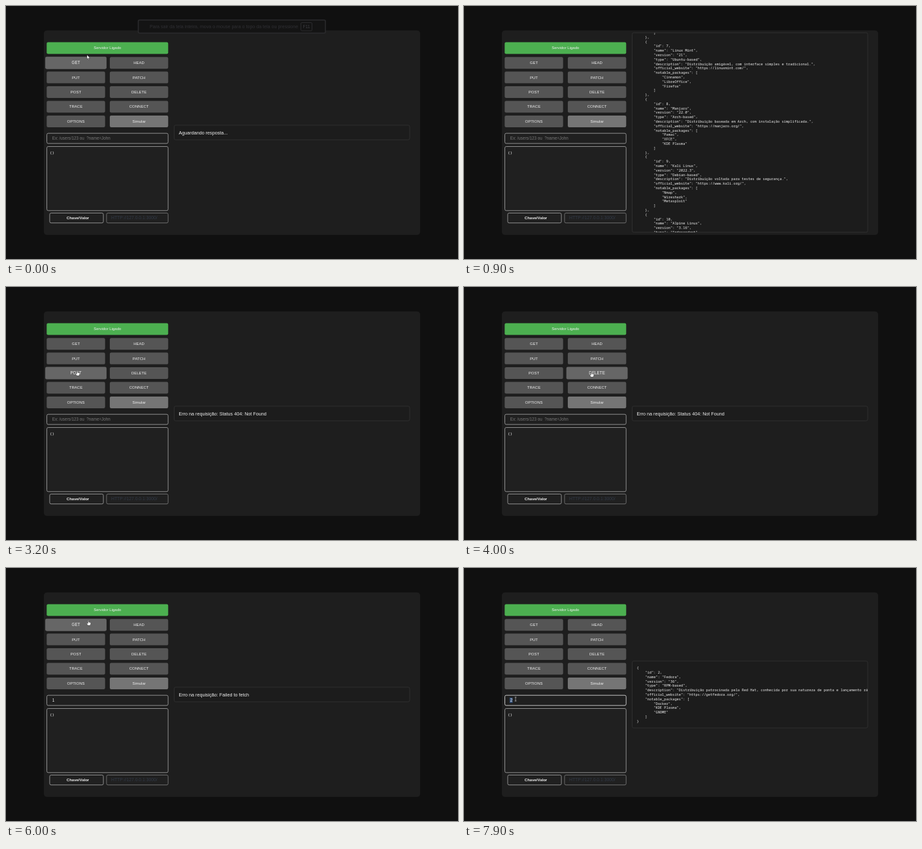
Animation of 692x388 px, one loop 8 s. Source, as an HTML page:

```html
<!DOCTYPE html>
<html lang="pt">
<head>
<meta charset="utf-8">
<title>Simulador HTTP</title>
<style>
html, body { margin: 0; width: 100%; height: 100%; overflow: hidden; background: #101010; }
svg { display: block; width: 100vw; height: 100vh; }
text { font-family: "Liberation Sans", Arial, sans-serif; fill: #f0f0f0; white-space: pre; }
.mono { font-family: "Noto Sans Mono", "DejaVu Sans Mono", monospace; font-size: 5.36px; }
.mid { text-anchor: middle; font-size: 6px; }
.field { fill: #202020; stroke: #9a9a9a; stroke-width: .9; }
</style>
</head>
<body>
<svg id="stage" viewBox="0 0 692 388"></svg>
<script>
const LOOP = 8000, STEP = 100;
const MID_Y = 194, PAD = 7, MONO_LINE = 6.8, SANS_LINE = 8.3, MAX_H = 306;
const stage = document.getElementById('stage');

function add(parent, tag, attrs = {}, text = '') {
  const el = document.createElementNS('http://www.w3.org/2000/svg', tag);
  set(el, attrs);
  if (text) el.textContent = text;
  parent.appendChild(el);
  return el;
}
function set(el, attrs) {
  for (const key in attrs) el.setAttribute(key, attrs[key]);
}
const rect = (parent, x, y, width, height, rx, attrs) =>
  add(parent, 'rect', { x, y, width, height, rx, ...attrs });

// Server data
const distro = (id, name, version, type, description, site, packages) => ({
  id, name, version, type, description,
  official_website: `https://${site}/`,
  notable_packages: packages.split(',')
});
const distros = [
  distro(1, 'Ubuntu', '22.04 LTS', 'Debian-based', 'Uma distribuição popular e fácil de usar, ideal para iniciantes e servidores.', 'ubuntu.com', 'GNOME,LibreOffice,Firefox'),
  distro(2, 'Fedora', '36', 'RPM-based', 'Distribuição patrocinada pela Red Hat, conhecida por sua natureza de ponta e lançamento rápido.', 'getfedora.org', 'Docker,KDE Plasma,GNOME'),
  distro(3, 'Arch Linux', 'Rolling Release', 'Independent', 'Distribuição leve e flexível, voltada para usuários avançados.', 'archlinux.org', 'Pacman,Xorg,Vim'),
  distro(4, 'Debian', '11 (Bullseye)', 'Debian-based', 'Uma das distribuições mais estáveis e com uma vasta biblioteca de pacotes, ideal para servidores.', 'www.debian.org', 'Apache,Nginx,MySQL'),
  distro(5, 'CentOS', 'Stream 9', 'RPM-based', 'Distribuição popular entre servidores, baseada no código-fonte do Red Hat Enterprise Linux.', 'www.centos.org', 'MariaDB,SELinux,Kubernetes'),
  distro(6, 'openSUSE', 'Leap 15.4', 'RPM-based', 'Uma distribuição estável, conhecida por sua versatilidade e opções de instalação.', 'www.opensuse.org', 'YaST,KDE Plasma,GNOME'),
  distro(7, 'Linux Mint', '21', 'Ubuntu-based', 'Distribuição amigável, com interface simples e tradicional.', 'linuxmint.com', 'Cinnamon,LibreOffice,Firefox'),
  distro(8, 'Manjaro', '22.0', 'Arch-based', 'Distribuição baseada em Arch, com instalação simplificada.', 'manjaro.org', 'Pamac,XFCE,KDE Plasma'),
  distro(9, 'Kali Linux', '2022.3', 'Debian-based', 'Distribuição voltada para testes de segurança.', 'www.kali.org', 'Nmap,Wireshark,Metasploit'),
  distro(10, 'Alpine Linux', '3.16', 'Independent', 'Distribuição mínima, muito usada em contêineres.', 'alpinelinux.org', 'BusyBox,OpenRC,musl')
];
const failed = 'Erro na requisição: ';
const unsupported = method =>
  `${failed}Failed to execute 'fetch' on\n'Window': '${method}' HTTP method is unsupported.`;

// [start, content]: objects are shown as JSON, strings as plain text
const responses = [
  [0, 'Aguardando resposta...'],
  [500, distros],
  [1500, { 'content-length': '3313', 'content-type': 'application/json; charset=utf-8' }],
  [2100, failed + 'Status 404: Not Found'],
  [4300, unsupported('TRACE')],
  [4600, unsupported('CONNECT')],
  [5100, failed + 'Failed to fetch'],
  [6100, distros[0]],
  [6900, distros[1]]
];
const scrollKeys = [[500, 0], [700, 267], [900, 534], [1000, 605]];
const pointerKeys = [
  [0, 124, 75], [100, 126, 82], [200, 124, 84], [400, 124, 84],
  [1100, 300, 130], [1300, 200, 86], [1500, 200, 86], [1700, 200, 103], [1800, 201, 106], [2000, 201, 106],
  [2300, 120, 106], [2700, 105, 107], [2800, 105, 107], [3000, 108, 111], [3100, 108, 111],
  [3200, 109, 128], [3500, 110, 129], [3600, 110, 129], [3800, 170, 130], [4000, 195, 130],
  [4200, 118, 150], [4300, 108, 151], [4500, 190, 151], [4600, 190, 152], [4800, 101, 178], [5200, 101, 178],
  [5400, 90, 201], [5600, 90, 201], [5900, 124, 84], [6000, 126, 80], [6300, 126, 80],
  [6500, 90, 202], [6600, 46, 203], [6700, 90, 190], [6900, 122, 84], [7000, 122, 84],
  [7500, 84, 201], [7700, 47, 204], [7900, 79, 201]
];
const typed = [[0, ''], [5600, '1'], [6700, '2']];

const within = (t, a, b) => t >= a && t < b;
const latest = (keys, t) => keys.filter(k => k[0] <= t).pop();
function tween(keys, t) {
  const i = keys.findIndex(k => k[0] > t);
  if (i < 0) return keys[keys.length - 1].slice(1);
  if (i === 0) return keys[0].slice(1);
  const a = keys[i - 1], b = keys[i];
  const p = (t - a[0]) / (b[0] - a[0]);
  return a.slice(1).map((v, n) => v + (b[n + 1] - v) * p);
}

// Static layout
rect(stage, 0, 0, 692, 388, 0, { fill: '#101010' });
rect(stage, 58, 37.5, 576, 313.5, 4.5, { fill: '#1e1e1e' });

const buttons = [];
function button(label, x, y, w, fill) {
  const g = add(stage, 'g');
  const cx = x + w / 2, cy = y + 9;
  const face = rect(g, x, y, w, 18, 2.2, { fill });
  add(g, 'text', { x: cx, y: cy + 1.9, class: 'mid' }, label);
  return { g, face, x, y, w, cx, cy, fill };
}
button('Servidor Ligado', 62.3, 55.5, 186, '#4caf50');
['GET', 'HEAD', 'PUT', 'PATCH', 'POST', 'DELETE', 'TRACE', 'CONNECT', 'OPTIONS', 'Simular']
  .forEach((label, i) => buttons.push(button(label,
    i % 2 ? 158.9 : 62.3, 78.2 + (i >> 1) * 22.42, 89.4, label === 'Simular' ? '#757575' : '#555555')));

const pathBox = rect(stage, 62.5, 195.2, 185.7, 15.6, 2.2, { class: 'field' });
const selection = rect(stage, 69.8, 198.8, 4.6, 8, 0, { fill: '#34507a' });
const pathText = add(stage, 'text', { x: 70.7, y: 205.2, 'font-size': 6.3 });
rect(stage, 62.5, 215.5, 185.7, 98.3, 2.2, { class: 'field' });
add(stage, 'text', { x: 67, y: 227, class: 'mono', style: 'font-size:5.9px' }, '{}');
rect(stage, 66.9, 317.5, 82.2, 15.2, 2.2, { class: 'field' });
add(stage, 'text', { x: 110, y: 326.9, class: 'mid', 'font-weight': 'bold' }, 'Chave/Valor');
rect(stage, 153.9, 317.5, 94.3, 15.2, 2.2, { class: 'field', style: 'stroke:#777' });
add(stage, 'text', { x: 161, y: 327.3, 'font-size': 6.8, style: 'fill:#323a48' }, 'HTTP://127.0.0.1:3000/');

// Response box
const clip = add(add(stage, 'defs'), 'clipPath', { id: 'clip' });
const clipRect = rect(clip, 257.5, 0, 360.5, 0, 2);
const resultBox = rect(stage, 257.5, 0, 360.5, 0, 2.2, { fill: '#1c1c1c', stroke: '#343434', 'stroke-width': .8 });
const clipped = add(stage, 'g', { 'clip-path': 'url(#clip)' });
const result = add(clipped, 'g');
let shown = null;

function showResult(content) {
  if (content === shown) return;
  shown = content;
  const json = typeof content !== 'string';
  const lines = (json ? JSON.stringify(content, null, 4) : content).split('\n');
  const lineH = json ? MONO_LINE : SANS_LINE;
  const height = Math.min(MAX_H, lines.length * lineH + 2 * PAD);
  const y = MID_Y - height / 2;
  [resultBox, clipRect].forEach(el => set(el, { y, height }));
  result.replaceChildren();
  lines.forEach((line, i) => add(result, 'text', {
    x: 264.5,
    y: y + PAD + lineH * (i + .5) + (json ? 1.9 : 2.5),
    ...(json ? { class: 'mono' } : { 'font-size': 7.2 })
  }, line));
}

// Full-screen notice
const notice = add(stage, 'g');
rect(notice, 202.5, 21.5, 286.5, 20, 2, { fill: '#141414', stroke: '#2b2b2d', 'stroke-width': 1.5 });
add(notice, 'text', { x: 220, y: 33.8, 'font-size': 7.1, style: 'fill:#303034' },
  'Para sair da tela inteira, mova o mouse para o topo da tela ou pressione');
rect(notice, 451.5, 25.5, 17, 12.5, 1.5, { fill: 'none', stroke: '#2b2b2d' });
add(notice, 'text', { x: 460, y: 33.8, class: 'mid', style: 'fill:#3c3c40;font-size:6.8px' }, 'F11');

// Pointers
const pointer = add(stage, 'g');
const shapes = {
  arrow: add(pointer, 'path', { d: 'M0 0V6.4L1.5 5.1L2.5 7.3L3.5 6.9L2.5 4.8H4.5Z', fill: '#fff', stroke: '#111', 'stroke-width': .4 }),
  hand: add(pointer, 'path', { d: 'M-.6 .6Q0 -.4 .6 .6V3L3.2 3.6Q4 4 3.8 5.4L3 8H-.8L-2.6 5Q-2.2 3.9 -.6 5.2Z', fill: '#fff', stroke: '#111', 'stroke-width': .4 }),
  beam: add(pointer, 'path', { d: 'M-1.3 -3H1.3M0 -3V3M-1.3 3H1.3', fill: 'none', stroke: '#c8c8c8', 'stroke-width': .7 })
};

function drawPointer(t) {
  const hidden = within(t, 500, 1100);
  const [x, y] = tween(pointerKeys, t);
  const over = hidden ? null : buttons.find(b => x >= b.x && x <= b.x + b.w && y >= b.y - 4 && y <= b.y + 18);
  buttons.forEach(b => {
    const hot = b === over;
    set(b.face, { fill: hot ? (b.fill === '#757575' ? '#808080' : '#666666') : b.fill });
    set(b.g, { transform: hot ? `translate(${b.cx} ${b.cy}) scale(1.05) translate(${-b.cx} ${-b.cy})` : '' });
  });
  const inField = x > 62 && x < 248 && y > 195 && y < 211;
  const kind = over && y >= over.y ? 'hand' : inField ? 'beam' : 'arrow';
  for (const name in shapes) set(shapes[name], { visibility: name === kind && !hidden ? 'visible' : 'hidden' });
  set(pointer, { transform: `translate(${x} ${y})` });
}

function draw(t) {
  set(notice, { opacity: Math.max(0, 1 - t / 200) });
  showResult(latest(responses, t)[1]);
  const scroll = shown === distros ? tween(scrollKeys, t)[0] : 0;
  set(result, { transform: `translate(0 ${-scroll})` });

  const value = latest(typed, t)[1];
  const selected = within(t, 6600, 6700) || t >= 7600;
  const focused = within(t, 5500, 5700) || within(t, 6500, 6800) || t >= 7500;
  pathText.textContent = value || 'Ex: /users/123 ou  ?name=John';
  pathText.style.fill = value ? '#f0f0f0' : '#777';
  pathBox.style.stroke = focused ? '#d4d4d4' : '#9a9a9a';
  set(selection, { visibility: selected ? 'visible' : 'hidden' });
  drawPointer(t);
}

const start = performance.now();
function tick() {
  const t = (performance.now() - start) % LOOP;
  draw(Math.floor(t / STEP) * STEP);
  requestAnimationFrame(tick);
}
tick();
</script>
</body>
</html>
```
